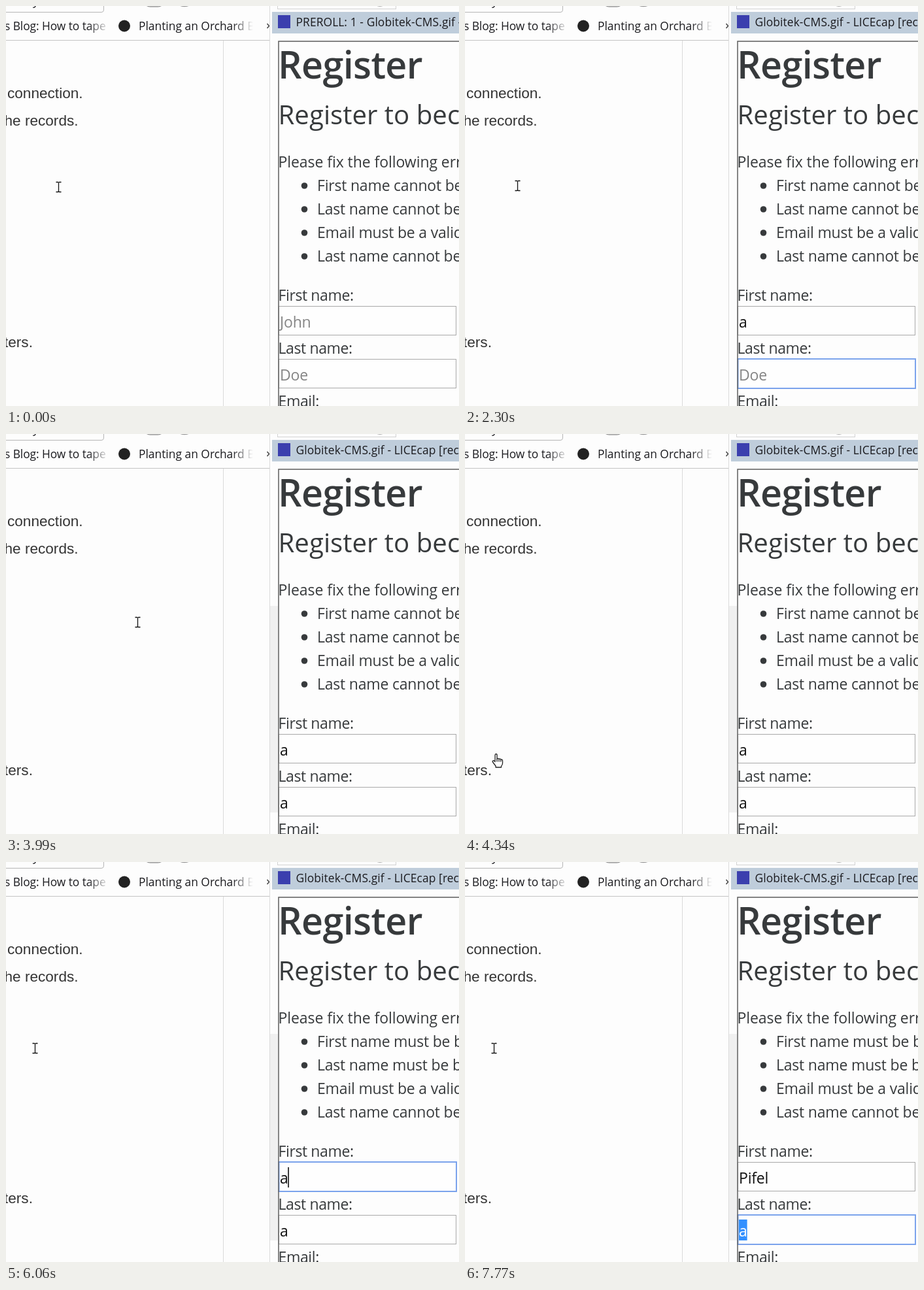
Animation, 693 px wide and 612 px high, one loop 8000 ms. Source, as an HTML page:

```html
<!DOCTYPE html>
<html lang="en">
<head>
<meta charset="utf-8">
<title>Register form</title>
<style>
  html, body { margin: 0; width: 100%; height: 100%; overflow: hidden; background: #fdfdfd; }
  svg { display: block; width: 693px; height: 612px; }
  text { font-family: "Open Sans", "Noto Sans", sans-serif; fill: #373a3c; }
  .page text { font-family: "Liberation Sans", Arial, sans-serif; font-size: 22.6px; fill: #333; }
  .ui text { font-size: 17.4px; fill: #1b1b1f; }
  .form text { font-size: 23px; }
  .menu text { font-size: 17px; fill: #111; }
  .menu .bold { font-size: 16.5px; font-weight: 700; fill: #000; }
  .menu .hint { fill: #757575; text-anchor: end; }
</style>
</head>
<body>
<svg id="stage" viewBox="0 0 693 612">
  <defs>
    <linearGradient id="fade">
      <stop offset="0" stop-color="#fdfdfd" stop-opacity="0"/>
      <stop offset="1" stop-color="#fdfdfd"/>
    </linearGradient>
  </defs>
  <rect width="693" height="612" fill="#fdfdfd"/>

  <g class="ui">
    <text x="41" y="-1">y</text>
    <path d="M0 9.5H146Q149.5 9.5 149.5 6V0" fill="none" stroke="#b5b5b5"/>
    <path d="M215 -1Q217 1 221 1H232Q236 1 238 -1M264 -2Q273 3 282 -2" fill="none" stroke="#999" stroke-width="1.5"/>
    <text x="-2" y="37" letter-spacing="-.08">s Blog: How to tape</text>
    <rect x="126" y="18" width="32" height="28" fill="url(#fade)"/>
    <circle cx="181" cy="30.5" r="9" fill="#222"/>
    <text x="203" y="37">Planting an Orchard B</text>
    <rect x="346" y="18" width="32" height="28" fill="url(#fade)"/>
    <rect x="378" y="18" width="20" height="28" fill="#fdfdfd"/>
    <path d="M399.5 27L402.5 30.5L399.5 34" fill="none" stroke="#444" stroke-width="1.5"/>
    <path d="M0 52.5H403" stroke="#c4c4c4"/>
    <path d="M332.5 53V612M403.5 0V612" stroke="#dadada"/>
  </g>

  <g class="page">
    <text x="2" y="141">connection.</text>
    <text x="-2.5" y="183">he records.</text>
    <text x="-3" y="522">ters.</text>
  </g>

  <rect id="strip" x="404" width="12" fill="#f0f0f0"/>

  <g class="ui">
    <path d="M415.5 0V4.5M596.5 0V4.5M415 4.5H597" fill="none" stroke="#d2d2d2"/>
    <path d="M565 -2Q572 3 579 -2" fill="none" stroke="#aaa"/>
    <rect x="407" y="9" width="286" height="33" fill="#bfcddb"/>
    <rect x="416" y="14" width="19" height="20" fill="#3b3fae"/>
    <text id="title" x="443.5" y="31" letter-spacing=".09"></text>
  </g>

  <g class="form" id="form">
    <text x="416" y="111" style="font-size:57.5px;font-weight:600" letter-spacing="-.7">Register</text>
    <text x="416.5" y="181" style="font-size:40.2px">Register to become</text>
    <text x="416.5" y="247" letter-spacing="-.07">Please fix the following errors:</text>
  </g>
  <g id="fields" class="form"></g>
  <g id="menus" class="menu"></g>
  <path d="M417 612V54H693" fill="none" stroke="#5c5c5c" stroke-width="1.5"/>

  <g id="beam" fill="none" stroke="#111" stroke-width="1.3">
    <path d="M-4 -7.5H-1.2L0 -6.7L1.2 -7.5H4M0 -7V7M-4 7.5H-1.2L0 6.7L1.2 7.5H4"/>
  </g>
  <g id="hand" fill="#fff" stroke="#222" stroke-width="1.3" stroke-linejoin="round">
    <path d="M-4 2V-8Q-4 -10 -2.5 -10T-1 -8V-2.5Q.5 -4 2 -2.2Q3.5 -3.4 4.8 -1.4Q7.5 -2 7.5 .8V4Q7.5 7 5.5 8.5V10.5H-3V8.5L-7.5 2.5Q-8.5 .5 -6.5 .2Q-5.2 .3 -4 2Z"/>
    <path d="M-1 -2.5V2M2 -2V2M4.8 -1.2V2" fill="none"/>
  </g>
</svg>
<script>
const LOOP = 8000;
const $ = id => document.getElementById(id);

function add(parent, tag, attrs = {}, content = '') {
  const el = document.createElementNS('http://www.w3.org/2000/svg', tag);
  for (const key in attrs) el.setAttribute(key, attrs[key]);
  el.textContent = content;
  parent.appendChild(el);
  return el;
}
const set = (el, attrs) => { for (const key in attrs) el.setAttribute(key, attrs[key]); };
const show = (el, on) => el.setAttribute('visibility', on ? 'visible' : 'hidden');

// Error list
const errors = ['', '', 'Email must be a valid', 'Last name cannot be blank'].map((line, i) => {
  const y = 283 + 36 * i;
  add($('form'), 'circle', { cx: 456.5, cy: y - 8, r: 4.8, fill: '#373a3c' });
  return add($('form'), 'text', { x: 476, y, 'letter-spacing': -.2 }, line);
});

// Inputs
const label = (text, y) => add($('form'), 'text', { x: 416.5, y, 'letter-spacing': -.38 }, text);
label('First name:', 451);
label('Last name:', 532);
label('Email:', 613);

function makeField(y, hint) {
  const g = $('fields');
  const box = add(g, 'rect', { x: 417.5, fill: '#fefefe' });
  const mark = add(g, 'rect', { x: 419, y: y + 7, height: 32, fill: '#3390ff' });
  const text = add(g, 'text', { x: 419, y: y + 33, 'letter-spacing': -.2 });
  const caret = add(g, 'rect', { y: y + 8, width: 1.5, height: 31, fill: '#000' });
  return (value, focus, caretOn, selected) => {
    set(box, focus
      ? { y, width: 271.5, height: 45, stroke: '#7ba3ec', 'stroke-width': 2 }
      : { y: y + .5, width: 271, height: 44, stroke: '#a9a9a9', 'stroke-width': 1 });
    text.textContent = value || hint;
    text.style.fill = selected ? '#fff' : value ? '#111' : '#858585';
    const width = value ? text.getComputedTextLength() : 0;
    set(caret, { x: 419 + width - (value ? .3 : 0) });
    set(mark, { width });
    show(caret, focus && caretOn);
    show(mark, selected);
  };
}
const first = makeField(459, 'John');
const last = makeField(540, 'Doe');

// Suggestion lists
function makeMenu(y, items, footer) {
  const g = add($('menus'), 'g');
  add(g, 'rect', { x: 417.5, y: y - .5, width: 271, height: 130, fill: '#fefefe', stroke: '#b8b8b8' });
  items.forEach(([name, hint], i) => {
    add(g, 'text', { class: 'bold', x: 429.5, y: y + 25 + 36 * i }, name);
    if (hint) add(g, 'text', { class: 'hint', x: 675, y: y + 25 + 36 * i }, hint);
  });
  if (footer) {
    add(g, 'path', { d: `M417 ${y + 73.5}H689`, stroke: '#666' });
    add(g, 'text', { x: 429, y: y + 98 }, footer);
  }
  return g;
}
const menus = {
  short: makeMenu(504, [['asdasd'], ['a'], ['asd']]),
  last: makeMenu(585, [['a']]),
  person: makeMenu(504, [['Pifel', 'Pifel Dovask'], ['PIFEL', 'PIFEL DOVASK']], 'Novrem Autofill settings...')
};

// Each step overrides part of the state from its time on
const steps = [
  [0, { title: 'PREROLL: 1 - Globitek-CMS.gif - LICEcap', rule: 'cannot be blank',
        a: '', b: '', focus: 0, caret: true, menu: '', selected: false, strip: 0 }],
  [30, { title: 'Globitek-CMS.gif - LICEcap [recording]' }],
  [330, { focus: 1 }],
  [870, { caret: false }],
  [940, { a: 'a', caret: true }],
  [1010, { menu: 'short' }],
  [1470, { menu: '' }],
  [1590, { focus: 2 }],
  [2160, { caret: false }],
  [2530, { strip: 265 }],
  [2640, { caret: true }],
  [3140, { b: 'a', menu: 'last' }],
  [3630, { caret: false, strip: 263 }],
  [3670, { focus: 0, menu: '' }],
  [4800, { rule: 'must be between' }],
  [6060, { focus: 1, caret: true }],
  [6590, { caret: false }],
  [6620, { a: '', caret: true }],
  [6960, { a: 'P', menu: 'person' }],
  [7110, { a: 'Pi' }],
  [7260, { a: 'Pif' }],
  [7380, { a: 'Pife' }],
  [7530, { a: 'Pifel' }],
  [7770, { focus: 2, caret: false, selected: true, menu: '' }]
];

function render(s) {
  $('title').textContent = s.title;
  errors[0].textContent = 'First name ' + s.rule;
  errors[1].textContent = 'Last name ' + s.rule;
  first(s.a, s.focus === 1, s.caret, false);
  last(s.b, s.focus === 2, s.caret, s.selected);
  for (const key in menus) show(menus[key], s.menu === key);
  set($('strip'), { y: s.strip, height: s.strip ? 579 - s.strip : 0 });
}

// Pointer path: time, x, y
const path = [
  [0, 80.5, 277], [2299, 80.5, 277], [2300, 80.5, 275], [2529, 80.5, 275],
  [2530, 80.5, 273], [3629, 80.5, 273], [3630, 80.5, 271], [3800, 80.5, 271],
  [3900, 146, 268], [4010, 213, 292], [4110, 180, 380], [4220, 95, 465],
  [4340, 50, 499.5], [5290, 50, 499.5], [5400, 50, 445], [5550, 44.5, 339],
  [5700, 44.5, 306], [5880, 44.5, 290], [6060, 44.5, 285], [LOOP, 44.5, 285]
];

function movePointer(t) {
  const i = path.findIndex(p => p[0] > t);
  const [t0, x0, y0] = path[i - 1], [t1, x1, y1] = path[i];
  const k = (t - t0) / (t1 - t0);
  const x = x0 + (x1 - x0) * k, y = y0 + (y1 - y0) * k;
  const over = y > 482;
  show($('hand'), over);
  show($('beam'), !over);
  set($(over ? 'hand' : 'beam'), { transform: `translate(${Math.round(x * 2) / 2} ${Math.round(y * 2) / 2})` });
}

let current = -1;
const start = performance.now();
function tick() {
  const t = (performance.now() - start) % LOOP;
  const count = steps.filter(s => s[0] <= t).length;
  if (count !== current) {
    current = count;
    render(Object.assign({}, ...steps.slice(0, count).map(s => s[1])));
  }
  movePointer(t);
  requestAnimationFrame(tick);
}
tick();
</script>
</body>
</html>
```
